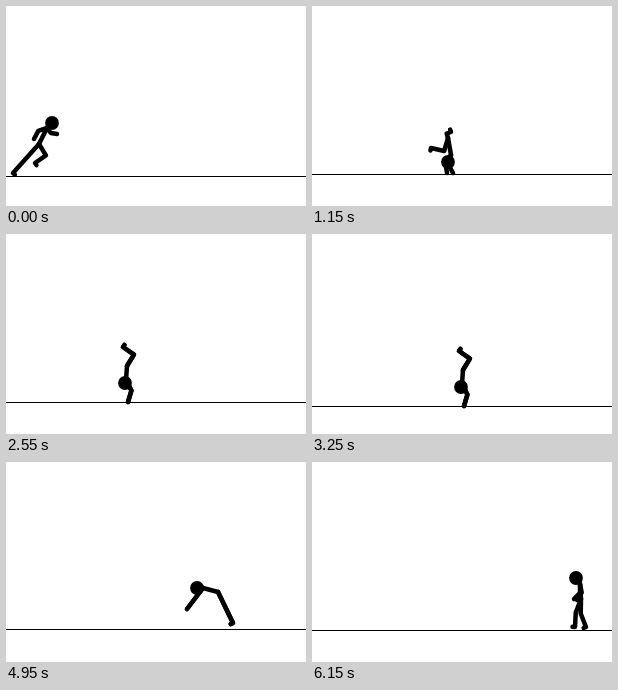
Write an HTML page with a canvas that moves like this. It is 300 px wide and 200 px high and loops after 6200 ms.

```html
<!DOCTYPE html>
<html lang="en">
<head>
<meta charset="utf-8">
<title>Tumbling stick figure</title>
<style>
html, body { margin: 0; width: 100%; height: 100%; overflow: hidden; background: #fff; }
canvas { display: block; }
</style>
</head>
<body>
<canvas width="300" height="200"></canvas>
<script>
const LOOP = 6200, STEP = 50, TAU = 2 * Math.PI;
const ctx = document.querySelector('canvas').getContext('2d');
const mix = (a, b, u) => a + (b - a) * u;
const bone = (x, y) => ({ len: Math.hypot(x, y), dir: Math.atan2(y, x) });

// Two bones that reach (x, y), with the joint pushed out to the given side.
function limb([x, y], reach, bend, side) {
  const d = Math.hypot(x, y);
  const out = side * Math.min(bend, Math.sqrt(Math.max(0, reach * reach - d * d / 4)) / d);
  const jx = x / 2 - y * out, jy = y / 2 + x * out;
  return [bone(jx, jy), bone(x - jx, y - jy)];
}

function leg(foot, facing) {
  const [thigh, shin] = limb(foot, 14.5, .47, -facing);
  return [thigh, shin, { len: 2.5, dir: shin.dir - facing * TAU / 4 }];
}

// Facing is 1 for right, -1 for left. Hands are seen from the neck, feet from the hip.
function pose(facing, rise, torso, head, handA, footA, handB = handA, footB = footA) {
  const arm = hand => limb(hand, 12, .2, facing);
  return {
    facing, rise, spine: [bone(...torso), bone(...head)],
    arms: [arm(handA), arm(handB)],
    legs: [leg(footA, facing), leg(footB, facing)]
  };
}

const sprint = pose(1, 32, [8, -16], [5, -5], [-13, 11], [-26, 29], [10, 6], [-4, 19]);
const stride = { ...sprint, arms: [...sprint.arms].reverse(), legs: [...sprint.legs].reverse() };
const plant = pose(1, 36, [3, 17], [-3, 7], [-4, 18], [-17, 10], [2, 18], [3, -6]);
const lean = pose(-1, 36, [-6, 16], [-2, 1], [2, 20], [13, -21]);
const invert = pose(-1, 36, [-1, 14], [-1, 3], [2, 22], [-4, -19]);
const flip = pose(-1, 50, [1, 15], [0, 2], [-19, 11], [-17, -11]);
const snap = pose(-1, 37, [-15, -4], [-6, 0], [-16, 21], [15, 31]);
const crouch = pose(-1, 26, [-6, -17], [-3, -6], [-16, 13], [0, 25]);
const arch = pose(-1, 30, [15, -5], [5, 3], [16, 23], [-14, 29]);
const stand = pose(-1, 31, [-1, -15], [-4, -6], [-6, 15], [-6, 28], [-3, 16], [5, 28]);

// Each moment: time, hip x, ground y, pose, and the poses passed through on the way to the next.
const spring = [snap, crouch, arch];
const moments = [
  [0, 33, 170, sprint, [stride, sprint, stride, arch]],
  [1150, 136, 168, plant, [invert, ...spring]],
  [1900, 117, 167, lean, spring],
  [2550, 121, 168, invert, [...spring, invert, ...spring]],
  [3950, 181, 171, flip, [...spring, invert]],
  [4950, 212, 167, snap, [crouch, stand, crouch, stand]],
  [6150, 269, 168, stand, []]
].map(([t, x, ground, body, via]) => ({ t, x, ground, body, via }));

// Turns from a to b, choosing the turn that lies within one circle above least.
function turn(a, b, u, least) {
  const d = (((b - a - least) % TAU) + TAU) % TAU + least;
  return a + d * u;
}

function blend(a, b, u) {
  // Once turned around, the body prefers to roll clockwise.
  const least = a.facing > 0 ? -TAU / 2 : -TAU / 6;
  const chain = (from, to) => from.map((p, i) => ({
    len: mix(p.len, to[i].len, u), dir: turn(p.dir, to[i].dir, u, least)
  }));
  return {
    rise: mix(a.rise, b.rise, u),
    spine: chain(a.spine, b.spine),
    arms: a.arms.map((arm, i) => chain(arm, b.arms[i])),
    legs: a.legs.map((leg, i) => chain(leg, b.legs[i]))
  };
}

// Strokes a chain of bones and returns its joints.
function trace(start, bones) {
  const joints = [start];
  for (const { len, dir } of bones) {
    const p = joints.at(-1);
    joints.push({ x: p.x + len * Math.cos(dir), y: p.y + len * Math.sin(dir) });
  }
  ctx.beginPath();
  joints.forEach(p => ctx.lineTo(p.x, p.y));
  ctx.stroke();
  return joints;
}

function draw(t) {
  const next = Math.max(1, moments.findIndex(m => m.t >= t));
  const a = moments[next - 1], b = moments[next];
  const u = (t - a.t) / (b.t - a.t);

  const path = [a.body, ...a.via, b.body];
  const place = u * (path.length - 1);
  const i = Math.min(Math.floor(place), path.length - 2);
  const body = blend(path[i], path[i + 1], place - i);

  const ground = Math.round(mix(a.ground, b.ground, u) + 2 * Math.sin(Math.PI * u));
  const hip = { x: mix(a.x, b.x, u), y: ground - body.rise };

  ctx.fillStyle = '#fff';
  ctx.fillRect(0, 0, 300, 200);
  ctx.fillStyle = '#000';
  ctx.fillRect(0, ground, 300, 1);
  ctx.lineWidth = 4.5;
  ctx.lineCap = ctx.lineJoin = 'round';
  const [, neck, head] = trace(hip, body.spine);
  body.arms.forEach(arm => trace(neck, arm));
  body.legs.forEach(leg => trace(hip, leg));
  ctx.beginPath();
  ctx.arc(head.x, head.y, 6.9, 0, TAU);
  ctx.fill();
}

const start = performance.now();
function tick() {
  draw(Math.floor((performance.now() - start) % LOOP / STEP) * STEP);
  requestAnimationFrame(tick);
}
tick();
</script>
</body>
</html>
```
